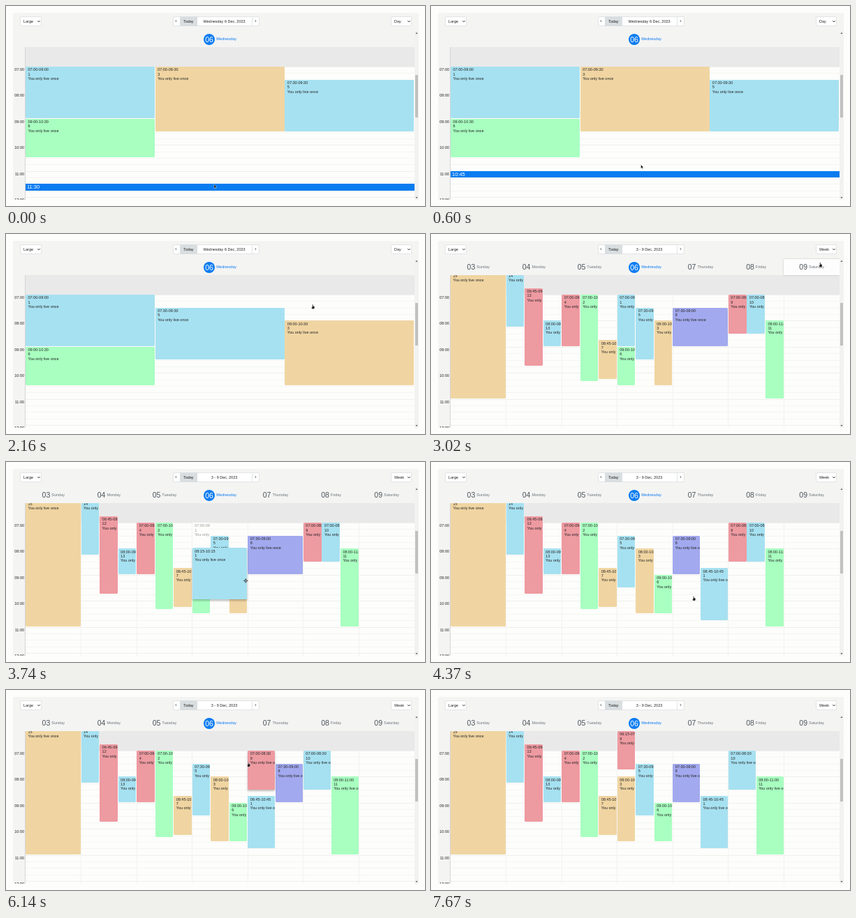
Recreate the animation shown at these times as an HTML page. Size 600 by 287 pixels, loop 7720 ms.

```html
<!DOCTYPE html>
<html lang="en">
<head>
<meta charset="utf-8">
<title>Calendar drag and drop</title>
<style>
html, body { margin: 0; width: 100%; height: 100%; overflow: hidden; background: #fdfdfb; }
#stage { position: relative; width: 600px; height: 287px; overflow: hidden; background: #fdfdfb;
  font: 5.5px/6.25px "Liberation Sans", Arial, sans-serif; color: #222; }
#stage div { position: absolute; box-sizing: border-box; white-space: pre; }
#stage .mid { display: flex; align-items: center; justify-content: center; }
.event { overflow: hidden; padding: 1.4px 0 0 3.5px; border-radius: 1.5px; }
.ghost { color: #999; background: #fdfdfb; }
.lift { z-index: 5; box-shadow: 0 2px 3px rgba(0, 0, 0, .25); }
.field { background: #fff; border: .5px solid #e2e4e5; border-radius: 2px; }
.num { font-size: 10.5px; margin-right: 2px; }
.dayhead { color: #6d747a; }
.dayhead .num { color: #4d545a; }
.dayhead.today { color: #0a7cf0; }
.dayhead.today .num { width: 16px; line-height: 16px; border-radius: 8px; background: #0a7cf0;
  color: #fff; text-align: center; }
.dayhead.hover { background: #fdfdfd; box-shadow: 0 0 2px rgba(0, 0, 0, .22); }
svg { position: absolute; overflow: visible; }
</style>
</head>
<body>
<div id="stage"></div>
<script>
const LOOP = 7720, WEEK_AT = 2660, SETTLE = 150;
const LEFT = 28, WIDTH = 557, TOP = 59, BOTTOM = 278;
const HOUR = 37.4, SLOT = HOUR / 4, TODAY = 3;
const COLORS = { blue: '#a6e1f1', orange: '#f0d5a2', green: '#a8ffc0', red: '#ee9aa1', violet: '#a2a9ee' };
const DAYS = ['Sunday', 'Monday', 'Tuesday', 'Wednesday', 'Thursday', 'Friday', 'Saturday'];

// id, color, day, start, hours
const events = [
  [15, 'orange', 0, 6, 5],
  [14, 'blue', 1, 6, 2.25], [12, 'red', 1, 6.75, 3], [13, 'blue', 1, 8, 1],
  [4, 'red', 2, 7, 2], [2, 'green', 2, 7, 10 / 3], [7, 'orange', 2, 8.75, 1.5],
  [1, 'blue', 3, 7, 2], [3, 'orange', 3, 7, 2.5], [5, 'blue', 3, 7.5, 2], [6, 'green', 3, 9, 1.5],
  [8, 'violet', 4, 7.5, 1.5],
  [9, 'red', 5, 7, 1.5], [10, 'blue', 5, 7, 1.5], [11, 'green', 5, 8, 3]
].map(([id, color, day, start, hours]) => ({ id, color, day, start, hours }));

const drags = [
  { id: 3, from: 1180, to: 1860 }, { id: 1, from: 3480, to: 3940 },
  { id: 9, from: 5420, to: 5970, calm: 6670 }, { id: 9, from: 6670, to: 7480 }
];

// time, x, y
const pointerPath = [
  [0, 298, 256], [450, 298, 256], [600, 300.5, 228], [1010, 305, 146], [1180, 305, 146],
  [1360, 307, 174.5], [1440, 307, 174.5], [1650, 307, 184], [1860, 307, 184],
  [2450, 566, 22], [2610, 562, 36], [3020, 558, 41], [3430, 282, 128], [3480, 282, 128],
  [3880, 376, 193], [4370, 376, 193], [5100, 436, 104], [5640, 436, 104], [5970, 350, 104],
  [6140, 347, 104], [7220, 347, 104], [7400, 300, 76], [7480, 292, 76], [7660, 285, -14], [LOOP, 285, -14]
];

const stage = document.getElementById('stage');
const mix = (a, b, k) => a + (b - a) * k;
const clamp = k => Math.max(0, Math.min(1, k));
const ease = k => 1 - (1 - clamp(k)) ** 3;
const hourY = h => 87 + (h - 7) * HOUR;

function clock(h) {
  const m = Math.round(h * 60);
  return [Math.floor(m / 60), m % 60].map(n => String(n).padStart(2, '0')).join(':');
}

// Mean of f over the last span of time, for parts that trail the pointer
function trail(f, t, span) {
  const steps = 15;
  let sum = 0;
  for (let i = 0; i < steps; i++) sum += f(Math.max(0, t - i * span / steps));
  return sum / steps;
}

function pointerAt(t) {
  const i = Math.max(1, pointerPath.findIndex(p => p[0] > t));
  const a = pointerPath[i - 1], b = pointerPath[i];
  const k = clamp((t - a[0]) / (b[0] - a[0]));
  return [mix(a[1], b[1], k), mix(a[2], b[2], k)];
}

// Share each day's width among overlapping events
function arrange(list) {
  const placed = {};
  for (let day = 0; day < 7; day++) {
    let group = [], ends = [];
    const close = () => group.forEach(p => { p.cols = ends.length; });
    for (const e of list.filter(v => v.day === day).sort((a, b) => a.start - b.start)) {
      if (ends.every(end => end <= e.start)) { close(); group = []; ends = []; }
      const free = ends.findIndex(end => end <= e.start);
      const col = free < 0 ? ends.length : free;
      ends[col] = e.start + e.hours;
      group.push(placed[e.id] = { day, start: e.start, col });
    }
    close();
  }
  return placed;
}

function dragPlace(drag, t, days) {
  const [x, y] = pointerAt(Math.max(drag.from, Math.min(t, drag.to)));
  const y0 = pointerAt(drag.from)[1];
  const day = days === 1 ? TODAY : Math.floor((x - LEFT) / WIDTH * days);
  return { day, start: drag.origin.start + Math.round((y - y0) / SLOT) / 4, col: 0, cols: 1 };
}

const state = events.map(e => ({ ...e }));
const layouts = [arrange(state)];
drags.forEach((drag, i) => {
  drag.origin = layouts[i][drag.id];
  drag.after = layouts[i + 1] = {};
  const { day, start } = dragPlace(drag, drag.to, i ? 7 : 1);
  Object.assign(state.find(e => e.id === drag.id), { day, start });
  Object.assign(drag.after, arrange(state));
});

function put(node, x, y, w, h) {
  Object.assign(node.style, { left: x + 'px', top: y + 'px', width: w + 'px', height: h + 'px' });
}

function box(parent, x, y, w, h, style = '', text = '', cls = '') {
  const node = document.createElement('div');
  node.style.cssText = style;
  node.className = cls;
  node.textContent = text;
  put(node, x, y, w, h);
  parent.append(node);
  return node;
}

function shape(x, y, body) {
  stage.insertAdjacentHTML('beforeend',
    `<svg width="1" height="1" style="left:${x}px;top:${y}px;z-index:20">${body}</svg>`);
  return stage.lastElementChild;
}

// Scrolling body
const panel = box(stage, 0, TOP, 600, BOTTOM - TOP, 'overflow:hidden');
const grid = box(panel, 0, -TOP, 600, 287);
box(grid, 10, TOP, 18, 219, 'background:#f4f4f3;border-right:.7px solid #d5d6d6');
for (let h = 7; h < 12.2; h += .25)
  box(grid, LEFT, hourY(h), WIDTH, .6, `background:${h % 1 ? '#f5f5f2' : '#efefec'}`);
box(grid, LEFT, TOP, WIDTH, 28, 'background:#e9e9e9');
for (let h = 7; h <= 12; h++) box(grid, 10, hourY(h) + 1, 16, 6.25, 'text-align:right', clock(h));

function makeView(days, home, ownDrags) {
  const body = box(grid, 0, 0, 600, 287);
  const top = box(stage, 0, 0, 600, 0, 'z-index:11');
  const dayW = WIDTH / days, first = days === 1 ? TODAY : 0;
  const spot = p => [LEFT + dayW * (p.day - first + p.col / p.cols), hourY(p.start), dayW / p.cols];
  const note = (e, start) => `${clock(start)}-${clock(start + e.hours)}\n${e.id}\nYou only live once`;
  const fit = (node, e, [x, y, w]) => put(node, x, y, w - .8, e.hours * HOUR - .6);

  const heads = Array.from({ length: days }, (_, i) => {
    if (i) box(body, LEFT + i * dayW - .5, 87, .6, 191, 'background:#f2f2ef');
    const day = first + i;
    const head = box(top, LEFT + i * dayW, 36, dayW, 23, '', '',
      'mid dayhead' + (day === TODAY ? ' today' : ''));
    head.innerHTML = `<span class="num">0${day + 3}</span><span>${DAYS[day]}</span>`;
    return head;
  });

  const ghosts = ownDrags.map(drag => {
    const e = events.find(v => v.id === drag.id);
    const node = box(body, 0, 0, 0, 0, '', note(e, drag.origin.start), 'event ghost');
    fit(node, e, spot(drag.origin));
    return { node, drag };
  });

  const items = events.filter(e => days > 1 || e.day === TODAY).map(e => ({
    e, node: box(body, 0, 0, 0, 0, `background:${COLORS[e.color]}`, '', 'event')
  }));

  function drawItem({ e, node }, t) {
    let at = spot(home[e.id]), start = home[e.id].start, lifted = false;
    const blend = (goal, when) => {
      const k = ease((t - when) / SETTLE);
      at = at.map((v, i) => mix(v, goal[i], k));
    };
    for (const drag of ownDrags) {
      if (drag.id === e.id && t >= drag.from) {
        const held = Math.min(t, drag.to);
        blend([0, 1, 2].map(i => trail(s => spot(dragPlace(drag, s, days))[i], held, 80)), drag.from);
        start = dragPlace(drag, t, days).start;
        lifted = lifted || t < (drag.calm || drag.to + SETTLE);
      }
      if (t >= drag.to) {
        blend(spot(drag.after[e.id]), drag.to);
        start = drag.after[e.id].start;
      }
    }
    fit(node, e, at);
    const text = note(e, start);
    if (node.textContent !== text) node.textContent = text;
    node.classList.toggle('lift', lifted);
  }

  function draw(t, shown) {
    body.style.display = top.style.display = shown ? '' : 'none';
    if (!shown) return;
    for (const { node, drag } of ghosts)
      node.style.display = t >= drag.from && t < drag.to ? '' : 'none';
    for (const item of items) drawItem(item, t);
  }
  return { draw, heads, dayW };
}

// Toolbar
box(stage, 10, 10, 581, 49, 'background:#f4f4f3;z-index:10');
const bar = box(stage, 0, 0, 600, 0, 'z-index:12');
const label = (x, w, style, text) => box(bar, x, 15, w, 14, style, text, 'mid');
function select(x, w, text) {
  box(bar, x, 15, w, 14, '', '', 'field');
  shape(x + w - 4.5, 22, '<path d="M-1.7-.9 0 .9 1.7-.9" fill="none" stroke="#333"/>');
  return box(bar, x + 5, 19, w - 8, 6.25, '', text);
}
select(20, 31, 'Large');
const viewName = select(551, 30, 'Day');
box(bar, 239, 15, 124, 14, '', '', 'field');
label(249, 24.5, 'background:#d9dee0', 'Today');
label(239, 9, 'font-size:7px', '‹');
label(353, 9, 'font-size:7px', '›');
box(bar, 352, 15, .6, 14, 'background:#e2e4e5');
const dateName = label(273, 79, '', '');

// Scrollbar
box(stage, 585, 36, 6, 242, 'background:#f2f2f1;z-index:12');
box(stage, 585.5, 99, 4.8, 61, 'background:#c1c1c1;z-index:13');
shape(588, 38.5, '<path d="M-1.6.8 0-1 1.6.8Z" fill="#444"/>');
shape(588, 274.5, '<path d="M-1.6-.8 0 1 1.6-.8Z" fill="#444"/>');

const dayView = makeView(1, layouts[0], drags.slice(0, 1));
const weekView = makeView(7, layouts[1], drags.slice(1));
const slotBar = box(grid, LEFT, 0, WIDTH, SLOT,
  'background:#0a7cf0;color:#fff;font-size:7.5px;line-height:9.4px;padding-left:2px');

// Pointer: arrow, hand, move cross
const pointer = shape(0, 0, `
  <path d="M0 0V5.4L1.3 4.3 2.2 6.2 3 5.8 2.2 3.9H3.9Z" fill="#111" stroke="#fff" stroke-width=".4"/>
  <path d="M-.6 0Q0-.7.6 0V2L2.7 2.6V4.6L2 6.2H-.8L-2 3.6-.6 3.8Z" fill="#111" stroke="#fff" stroke-width=".4"/>
  <g fill="#fff" stroke="#333" stroke-width=".8"><circle r="1"/>${[0, 90, 180, 270].map(a =>
    `<path d="M0-1V-2.6M-1-1.8 0-2.8 1-1.8" fill="none" transform="rotate(${a})"/>`).join('')}</g>`);
pointer.style.zIndex = 30;

const slotAt = t => Math.floor((pointerAt(t)[1] - 87) / SLOT);

function drawSlot(t, y) {
  const shown = t < 1000 && y > hourY(9.5);
  slotBar.style.display = shown ? '' : 'none';
  if (!shown) return;
  slotBar.style.top = 87 + trail(slotAt, t, 150) * SLOT + 'px';
  slotBar.textContent = clock(7 + slotAt(t) / 4);
}

function drawPointer(t, x, y) {
  const dragging = drags.some(d => t >= d.from && t < d.to);
  const kind = dragging ? 2 : t < 850 || (t > 2250 && t < WEEK_AT) ? 0 : 1;
  [...pointer.children].forEach((p, i) => { p.style.display = i === kind ? '' : 'none'; });
  pointer.style.transform = `translate(${x}px, ${y}px)`;
}

function draw(t) {
  const week = t >= WEEK_AT;
  const [x, y] = pointerAt(t);
  viewName.textContent = week ? 'Week' : 'Day';
  dateName.textContent = week ? '3 - 9 Dec, 2023' : 'Wednesday 6 Dec, 2023';
  dayView.draw(t, !week);
  weekView.draw(t, week);
  const over = t < 3480 && y > 36 && y < TOP ? Math.floor((x - LEFT) / weekView.dayW) : -1;
  weekView.heads.forEach((head, i) => head.classList.toggle('hover', i === over));
  drawSlot(t, y);
  drawPointer(t, x, y);
}

const begun = performance.now();
function tick() {
  draw((performance.now() - begun) % LOOP);
  requestAnimationFrame(tick);
}
tick();
</script>
</body>
</html>
```
